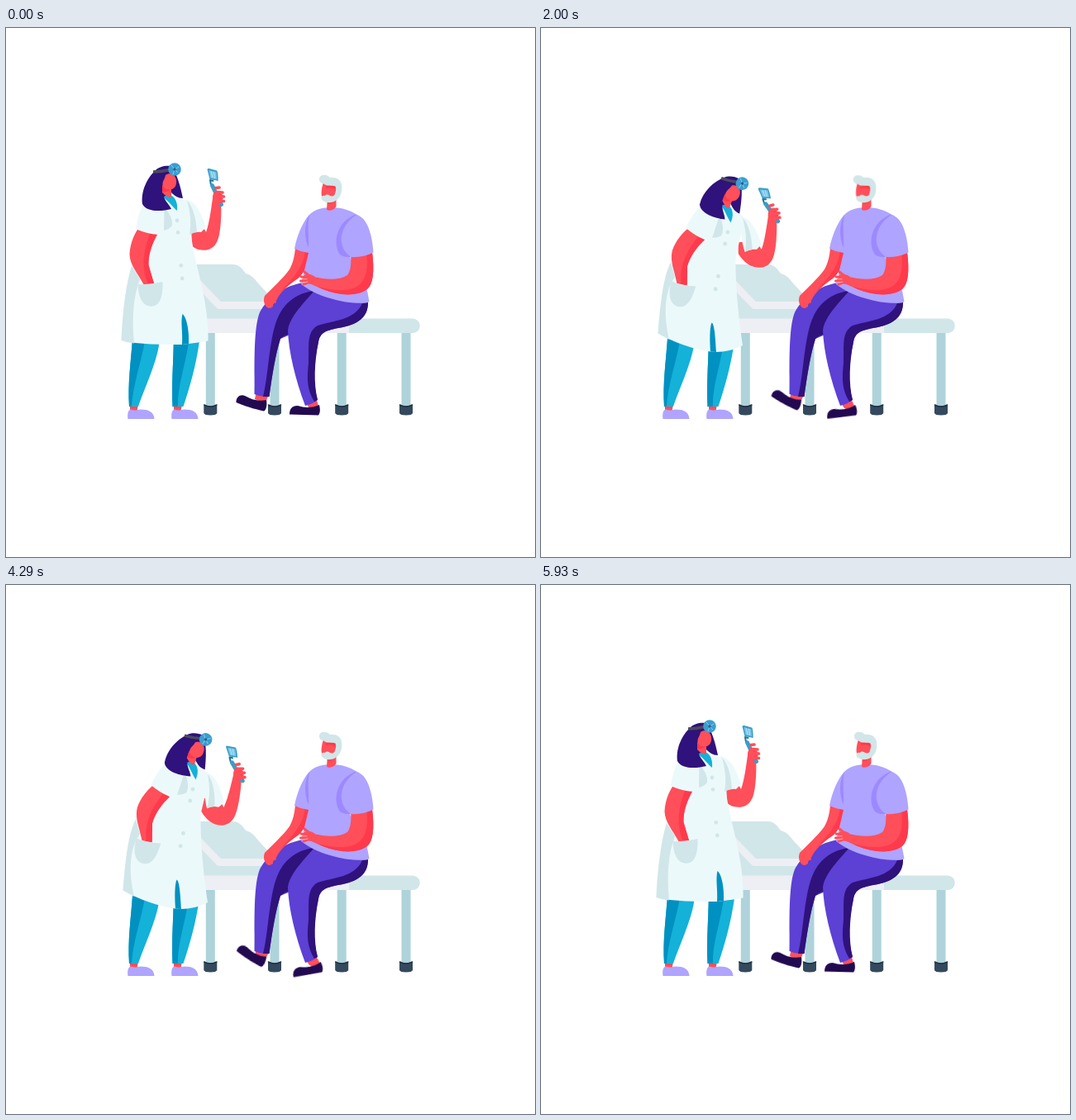
These frames come from a looping animation (640x640 px, 6 s). An HTML page:

```html
<!DOCTYPE html>
<html lang="en">
<head>
<meta charset="utf-8">
<title>Doctor and patient</title>
<style>
html, body { margin: 0; width: 100%; height: 100%; overflow: hidden; background: #fff; }
svg { display: block; width: 100vw; height: 100vh; }
.white { fill: #ecf9fb; }
.grey { fill: #d1e6e9; }
.pale { fill: #edeff5; }
.post { fill: #aed3da; }
.skin { fill: #ff4f5a; }
.blush { fill: #ff3a4c; }
.teal { fill: #14b1d9; }
.sea { fill: #0091c1; }
.lilac { fill: #afa4ff; }
.violet { fill: #9c89ff; }
.pants { fill: #5d40d4; }
.night { fill: #2f127b; }
.shoe { fill: #220a50; }
.line { fill: none; stroke-linecap: round; stroke-linejoin: round; }
#oldHead { transform-origin: 394px 212px; animation: shake 6s ease-in-out infinite; }
#farFoot, #nearFoot { animation: tap 1.2s ease-in-out infinite; }
#farFoot { --tilt: 18deg; transform-origin: 316px 450px; }
#nearFoot { --tilt: -13.5deg; transform-origin: 380px 447px; }
@keyframes tap {
  0%, 100% { transform: none; }
  42.5% { transform: rotate(var(--tilt)); }
}
@keyframes shake {
  0%, 23% { transform: rotate(0deg); }
  30% { transform: rotate(-8deg); }
  37.5% { transform: rotate(5deg); }
  45.2% { transform: rotate(-8deg); }
  53%, 100% { transform: rotate(0deg); }
}
</style>
</head>
<body>
<svg viewBox="0 0 640 640">
  <defs>
    <g id="post">
      <path class="post" d="M-5.5 366H5.5V458H-5.5Z"/>
      <path fill="#34495d" d="M-8 456Q0 459 8 456V466Q7 468.500 0 468.500T-8 466Z"/>
      <path class="line" stroke="#1f2f40" stroke-width="1.600" d="M-7.500 456Q0 460 7.500 456"/>
    </g>
    <g id="clog">
      <path class="skin" d="M150 455H160L158.500 464H150Z"/>
      <path class="lilac" d="M147.500 473C146.500 466 148 462 151 461.500C155 463.500 159 462 163 461.500C172 461.500 179 464 179.500 473Z"/>
    </g>
  </defs>

  <g id="bed">
    <path class="grey" d="M215 286H274C283 286 286 292 290 297C298 299 301 304 306 310L322 327V353H215Z"/>
    <path class="line" stroke="#edeff5" stroke-width="9" d="M222 298L258 335.500H322"/>
    <use href="#post" x="247.300"/><use href="#post" x="325"/>
    <use href="#post" x="406.200"/><use href="#post" x="484"/>
    <path class="pale" d="M220 351.500H420V369H220Z"/>
    <path class="grey" d="M415 351.500H492A8.700 8.700 0 0 1 492 369H415Z"/>
  </g>

  <g id="doctorLegs">
    <use href="#clog"/><use href="#clog" x="53"/>
    <path class="teal" d="M155 362H185L185 384C182 405 166 440 160 458H149C147 430 151 405 153 376Z"/>
    <path class="sea" d="M155 362H168L167 384C163 405 153 435 152 458H149C147 430 151 405 153 376Z"/>
    <path class="teal" d="M203 366H234V379C230 408 222 436 214.500 458H201.500C200 430 203 400 203 366Z"/>
    <path class="sea" d="M203 366H221V380C217 408 207 435 208 458H201.500C200 430 203 400 203 366Z"/>
  </g>

  <g class="torso"><g class="arm">
    <path class="skin" d="M214 238L237 238L242 247C246 236 248 220 250 206L260 205C261 225 260 247 256 257C251 269 241 270 233 268C226 266 219 260 214 252Z"/>
    <g class="hand">
      <path class="line" stroke="#21759a" stroke-width="2" d="M250.500 185L247 184L248 190"/>
      <path class="line" stroke="#3a9ec6" stroke-width="5" d="M249.500 190.500L260.500 213.500"/>
      <path fill="#3a9ec6" d="M243.500 171Q244 169.500 246 170L255 172.500Q256.500 173 256.700 185L246.500 183Z"/>
      <path fill="#79c5ea" d="M245.500 172L254.500 174.500L255 183L247.500 181.300Z"/>
      <path class="line" stroke="#b9e3f6" stroke-width="1" d="M248.500 174L250 181M251.500 174.500L252.500 181.500"/>
      <path class="skin" d="M250 204C251 198 254 195 258 198L263 203L261 212L250 212Z"/>
      <path class="line" stroke="#ff4f5a" stroke-width="3.600" d="M254 193.500L258 193M256 198.500L262 199M257 203.500L263.500 204M257 209L263.500 209.500"/>
      <path class="line" stroke="#ff3a4c" stroke-width=".8" d="M257 201.300L261 201.500M258 206.500L262 206.700"/>
    </g>
  </g></g>

  <path id="coat" class="white"/>
  <path id="coatShade" class="grey"/>
  <path id="slit" class="sea"/>

  <g class="torso">
    <path class="skin" d="M159 244L184 248C176 262 172 275 172.500 287L179 309L167 311C159 296 150 287 149.500 274C150 262 154 252 159 244Z"/>
    <path class="blush" d="M184 248C176 262 172 275 172.500 287L179 309L172 310C163 290 166 270 174 249Z"/>
    <path class="grey" d="M159.500 310Q175 311 189.500 307C190 320 188 333 180 336C166 340 160 326 159.500 310Z"/>
    <path class="white" d="M168 211C177 206 189 205 193 212L192 245L184 250Q170 249 157 243C159 231 162 218 168 211Z"/>
    <path class="grey" d="M191.500 217C197 223 202 231 201 239Q197 244 191 245Z"/>
    <g class="grey">
      <circle cx="207" cy="233" r="2.400"/><circle cx="208" cy="247.300" r="2.400"/>
      <circle cx="211.800" cy="287.300" r="2.400"/><circle cx="213.200" cy="303" r="2.400"/>
    </g>
    <g class="arm">
      <path class="white" d="M217 207C229 209 236 223 242 241L236 247Q229 246 222 250C218 240 216 222 217 207Z"/>
      <path class="grey" d="M219 209C225 214 230 228 231 247Q226 247 222 250C225 234 222 220 219 209Z"/>
    </g>
    <path class="teal" d="M187 196L199 202C205 205 208 211 207 221C200 215 194 206 188 204Z"/>
    <g id="head">
      <path class="night" d="M181 172C185 168 192 166 200 167C207 177 211 191 214 206C208 206 204 203 200 199L191 204C192 209 198 214 200 219C188 222 170 223 165 213C163 197 171 181 181 172Z"/>
      <path class="skin" d="M189 192H200V204C197 206 193 203 189 199Z"/>
      <path class="blush" d="M189 190L200 193C198 198 193 199 189 198Z"/>
      <path class="skin" d="M193 178C198 174 205 177 206 184C207 191 203 195.500 198 195.500C192 195 189 192 189.500 188C190 184 192 183 193 178Z"/>
      <path class="line" stroke="#4b4a5e" stroke-width="3.400" style="stroke-linecap:butt" d="M178 174Q188 174 198 171.500"/>
      <circle cx="204" cy="171" r="7.800" fill="#3a9ed0"/>
      <path class="line" stroke="#86cbea" stroke-width="1" d="M204 171L200 166M204 171L209 168M204 171L202 177M204 171L208 175"/>
      <circle cx="204" cy="171" r="1.700" fill="#2f5d8c"/>
    </g>
  </g>

  <g id="patient">
    <path class="skin" d="M303 440L318 443L314 453L301 449Z"/>
    <g id="farFoot">
      <path class="skin" d="M303 444L316 446L313 453L301 449Z"/>
      <path class="shoe" d="M278.500 453C278 446 284 442.500 289 445C297 449.500 305 452 315 450C316 456 315 462 312 463.500C300 461 288 457 278.500 453Z"/>
    </g>
    <path class="skin" d="M362 452L375 448L378 457L367 460Z"/>
    <g id="nearFoot">
      <path class="skin" d="M364 454L376 451L377.500 457L367 460Z"/>
      <path class="shoe" d="M343 467.500C343 460 347 456.500 353 457C362 460 371 459.500 379 456C380.500 462 380 466 378 468.500Z"/>
    </g>
    <path class="pants" d="M360 308C338 311 316 326 307 344C299 364 301 410 300.500 443Q309 447 318.500 446C322 420 326 395 332 376L365 362L385 318Z"/>
    <path class="night" d="M380 317C352 319 338 332 330 348C318 372 318 420 311 446L318.500 446C322 420 326 395 332 376Q336 372 344 370L362 345Z"/>
    <path class="pants" d="M374 317C395 327 420 334 438 332C438 350 426 359 402 363C386 366 380 369 378 380C372 405 371 430 377 450Q371 455 362 457C350 425 342 392 341 366C343 350 358 335 374 317Z"/>
    <path class="night" d="M438 332C438 350 426 359 402 363C386 366 380 369 378 380C373 405 372 430 377 450L373 452C364 437 364 425 366 405C367 385 363 368 377 360C395 354 422 354 431 333Z"/>
    <path class="skin" d="M350 266L368 269C368 284 361 296 353 303C340 312 331 321 328 328L320 339C314 340 310 331 313 324C322 315 335 303 343 292C347 285 349 277 350 266Z"/>
    <path class="blush" d="M362 268L368 269C368 284 361 296 353 303C344 309 337 315 332 320C346 302 360 292 362 268Z"/>
    <path class="line" stroke="#ff4f5a" stroke-width="4" d="M319 326L325 331M317 330L321 336"/>
    <path class="lilac" d="M366 227C373 219 384 217 394 217C407 217 417 221 425 226L438 262L416 277L437 318L439.500 331C436 334.500 410 333 392 327C378 323 366 317 357 310L366 272Q357 271 349 267C352 251 359 235 366 227Z"/>
    <path class="violet" d="M367 226C360 238 361 254 366 266C367 252 364 240 367 226Z"/>
    <path class="violet" d="M422 226C396 237 396 266 405 275Q411 278 420 277C404 262 405 243 427 227Z"/>
    <path class="skin" d="M417 274L443 271C446 295 444 310 437 316C425 325 403 324 383 316L367 309L372 301C386 304 402 306 413 299C417 294 418 285 417 274Z"/>
    <path class="blush" d="M436 272L443 271C446 295 444 310 437 316C425 325 403 324 383 316L377 313C400 319 421 319 430 308C437 300 438 286 436 272Z"/>
    <path class="lilac" d="M424 226C402 240 400 265 417 277Q432 278 444.500 271.500C443 250 437 229 424 226Z"/>
    <path class="skin" d="M374 301C368 297 363 297 360 300L358 306L368 310Z"/>
    <path class="line" stroke="#ff4f5a" stroke-width="3" d="M366 299L361 295M364 302L357 301M365 305L356.500 306M368 307L360 310"/>
    <path class="line" stroke="#ffb3b8" stroke-width=".9" d="M364 303.800L359 303.700M365 307L360 308"/>
    <path class="skin" d="M389 204H399.500V216C396 221 390 222 388 219.500Z"/>
    <path class="blush" d="M389 209L399 205C398 211 393 213 389 213Z"/>
    <g id="oldHead">
      <path class="skin" d="M384 187C381 196 381 203 383 206C390 210 398 207 399 200L401 188Z"/>
      <path class="blush" d="M387 191H398V195Q392 192 387 194Z"/>
      <path class="grey" d="M379 183C379 176.500 388 176 392 181C401 180 407 185 406.300 194C406 202 403 206 400 208C394 213 385 211.500 382.500 208C380 205 382 202 386 203C388 200 391 202 392 203C395 204 398 203 398 200C399 197 400 194 398.500 191.500C394 190 388 192 384.500 188.500C381 188 379 186 379 183Z"/>
    </g>
  </g>
</svg>
<script>
const LOOP = 6000, LEAN = 17.3, HIP = [170.5, 302.4];
const el = id => document.getElementById(id);
const smooth = x => x * x * (3 - 2 * x);

// keys: [time, value] pairs, eased between neighbours
function track(keys, t) {
  let i = 1;
  while (i < keys.length - 1 && t > keys[i][0]) i++;
  const [t0, a] = keys[i - 1], [t1, b] = keys[i];
  return a + (b - a) * smooth(Math.min(1, Math.max(0, (t - t0) / (t1 - t0))));
}

const lean = [[0, 0], [850, 1], [4480, 1], [5520, 0]];
const nod = [[0, 0], [710, -2], [1290, 4], [1900, 4], [2500, 0], [4200, 0], [4860, 2], [5600, 0]];
const arm = [[0, 0], [710, -11], [1290, -17], [2710, -17], [3640, -3], [4350, -12], [4860, -11], [5600, 0]];
const wrist = [[0, 0], [710, 7], [1290, -22], [2000, -10], [2710, -10], [3640, -5], [4860, -14], [5700, 0]];

const bump = (t, from, to) =>
  t > from && t < to ? Math.sin(Math.PI * (t - from) / (to - from)) ** 2 : 0;

function turn(selector, angle, x, y) {
  for (const part of document.querySelectorAll(selector))
    part.setAttribute("transform", `rotate(${angle.toFixed(2)} ${x} ${y})`);
}

// The upper coat follows the torso, the hem swings behind it.
function drawCoat(k, swing) {
  const a = k * LEAN * Math.PI / 180, c = Math.cos(a), s = Math.sin(a);
  const top = (x, y) => {
    const dx = x - HIP[0], dy = y - HIP[1];
    return `${(HIP[0] + dx * c - dy * s).toFixed(2)} ${(HIP[1] + dx * s + dy * c).toFixed(2)} `;
  };
  const hem = (x, y, x2, y2, w = 1) =>
    `${(x + (x2 - x) * k + swing * w).toFixed(2)} ${(y + (y2 - y) * k).toFixed(2)} `;
  const left = hem(139.5, 378, 141.5, 369.5);
  const slitTop = hem(213.5, 346, 206.5, 356.5, .3);
  const slitL = hem(213, 383, 205, 391.5, .3), slitR = hem(221, 382, 212, 392, .3);

  el("coat").setAttribute("d",
    `M${top(168, 212)}C${top(177, 205)}${top(184, 204)}${top(190, 202)}` +
    `L${top(207, 221)}L${top(207, 206)}` +
    `C${top(214, 207)}${top(219, 208)}${top(222, 212)}L${top(225, 258)}` +
    `C${hem(230, 290, 235, 293, .1)}${hem(246, 335, 236, 330, .3)}${hem(244.5, 378.5, 244, 384)}` +
    `C${hem(236, 380, 235, 389)}${hem(229, 381, 222, 392, .6)}${slitR}L${slitL}` +
    `C${hem(190, 383, 185, 389, .6)}${hem(160, 383, 160, 380)}${left}` +
    `C${hem(141, 345, 144, 340, .7)}${hem(145, 310, 147, 302, .3)}${top(152, 288)}` +
    `L${top(160, 248)}Z`);
  el("coatShade").setAttribute("d",
    `M${top(152, 288)}C${hem(145, 310, 147, 302, .3)}${hem(141, 345, 144, 340, .7)}${left}` +
    `Q${hem(147, 381, 148, 373)}${hem(155, 381.5, 155, 377)}` +
    `C${hem(152, 350, 149, 350, .7)}${hem(154, 325, 148, 320, .3)}${top(162, 304)}Z`);
  el("slit").setAttribute("d",
    `M${slitTop}C${hem(218, 349, 210, 358, .3)}${hem(222, 365, 211, 376, .3)}${slitR}` +
    `L${slitL}C${hem(214, 368, 204, 378, .3)}${hem(211, 356, 204, 362, .3)}${slitTop}Z`);
}

function frame(now) {
  const t = now % LOOP, k = track(lean, t);
  turn(".torso", k * LEAN, ...HIP);
  turn("#head", track(nod, t), 195, 205);
  turn(".arm", track(arm, t), 227, 210);
  turn(".hand", track(wrist, t), 256, 206);
  drawCoat(k, 5.5 * bump(t, 4380, 5650) - 6 * bump(t, 0, 1000));
  requestAnimationFrame(frame);
}
frame(performance.now());
</script>
</body>
</html>
```
